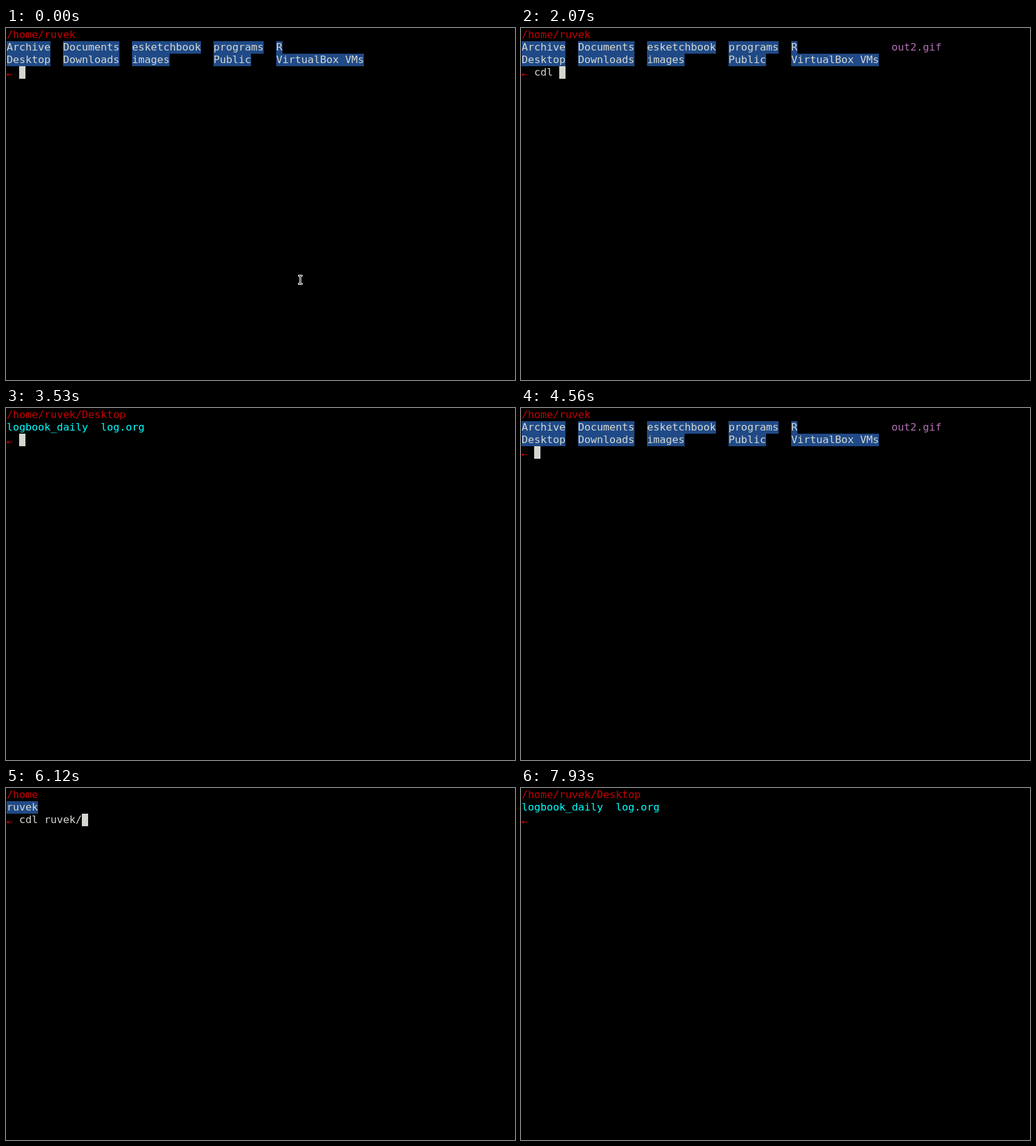
An HTML page that plays this animation: 812 px wide and 562 px high, repeating every 8 s.

```html
<!DOCTYPE html>
<html lang="en">
<head>
<meta charset="utf-8">
<title>Terminal session</title>
<style>
  html, body { margin: 0; width: 100%; height: 100%; overflow: hidden; background: #000; }
  svg { display: block; width: 812px; height: 562px; }
  text { font: 16.67px "DejaVu Sans Mono", monospace; white-space: pre; }
</style>
</head>
<body>
<svg id="stage" viewBox="0 0 812 562" xmlns="http://www.w3.org/2000/svg">
  <rect width="812" height="562" fill="#000"/>
  <g id="screen"></g>
  <g id="pointer" shape-rendering="crispEdges">
    <path fill="#fff" d="M466 394h7v3h-2v10h2v3h-7v-3h2v-10h-2z"/>
    <path fill="#000" d="M467 395h2v1h1v-1h2v1h-2v12h2v1h-2v-1h-1v1h-2v-1h2v-12h-2z"/>
  </g>
</svg>
<script>
const LOOP = 8000, CELL_W = 10, CELL_H = 20, PAD = 1, BASELINE = 15;
const RED = '#c40000', GREY = '#d3d7cf', BLUE = '#204a87', CYAN = '#00ffff', PINK = '#b070b0';
const USER = 'ruvek', HOME = '/home/' + USER;

const col = c => PAD + c * CELL_W;
const row = r => PAD + r * CELL_H;

function cells(c, r, n, fill) {
  return `<rect x="${col(c)}" y="${row(r)}" width="${n * CELL_W}" height="${CELL_H}" fill="${fill}"/>`;
}

// Each glyph sits on the terminal grid.
function print(c, r, str, fill) {
  const xs = [...str].map((_, i) => col(c + i)).join(' ');
  return `<text x="${xs}" y="${row(r) + BASELINE}" fill="${fill}">${str}</text>`;
}

const folder = (c, r, name) => cells(c, r, name.length, BLUE) + print(c, r, name, GREY);

const homeDirs = [
  [0, 'Archive', 'Desktop'],
  [9, 'Documents', 'Downloads'],
  [20, 'esketchbook', 'images'],
  [33, 'programs', 'Public'],
  [43, 'R', 'VirtualBox VMs']
].map(([c, top, low]) => folder(c, 1, top) + folder(c, 2, low)).join('');

const oldHome = { promptRow: 3, body: print(0, 0, HOME, RED) + homeDirs };
const home = { promptRow: 3, body: oldHome.body + print(59, 1, 'out2.gif', PINK) };
const desktop = {
  promptRow: 2,
  body: print(0, 0, HOME + '/Desktop', RED) +
        print(0, 1, 'logbook_daily', CYAN) + print(15, 1, 'log.org', CYAN)
};
const root = { promptRow: 2, body: print(0, 0, '/home', RED) + folder(0, 1, USER) };

// Listing on screen, then [time, typed text, cursor shown]
const session = [
  [oldHome, [0, ''], [100, '', false], [660, ''], [740, ''], [820, 'c'], [900, 'cd'], [980, 'cdl']],
  [home, [1310, ''], [1680, 'c'], [1780, 'cd'], [1880, 'cdl'], [2070, 'cdl '],
    [2630, 'cdl D'], [2860, 'cdl De'], [3090, 'cdl Desktop/']],
  [desktop, [3530, ''], [4050, '.'], [4130, '..'], [4330, '..l']],
  [home, [4560, ''], [4700, '.'], [4780, '..'], [4970, '..l']],
  [root, [5200, ''], [5410, 'c'], [5490, 'cd'], [5570, 'cdl'], [5730, 'cdl '],
    [5840, `cdl ${USER[0]}`], [6020, `cdl ${USER.slice(0, 2)}`], [6120, `cdl ${USER}/`],
    [6630, `cdl ${USER}/D`], [6870, `cdl ${USER}/De`], [7120, `cdl ${USER}/Desktop/`]],
  [desktop, [7400, ''], [7930, '', false]]
];
const steps = session.flatMap(([view, ...keys]) =>
  keys.map(([time, typed, cursor = true]) => ({ time, view, typed, cursor })));

const POINTER_HIDES = 740;
const screen = document.getElementById('screen');
const pointer = document.getElementById('pointer');
let shown = null;

function prompt(r) {
  const y = row(r) + 13;
  return `<path fill="${RED}" shape-rendering="crispEdges" ` +
    `d="M1 ${y}h1v-1h1v-1h1v2h6v1h-6v2h-1v-1h-1v-1h-1z"/>`;
}

function draw(t) {
  const step = steps.findLast(s => s.time <= t);
  if (step === shown) return;
  shown = step;
  const { view, typed, cursor } = step, r = view.promptRow;
  screen.innerHTML = view.body + prompt(r) +
    (typed ? print(2, r, typed, GREY) : '') +
    (cursor ? cells(2 + typed.length, r, 1, GREY) : '');
  pointer.style.display = t < POINTER_HIDES ? '' : 'none';
}

const start = performance.now();
function tick() {
  draw((performance.now() - start) % LOOP);
  requestAnimationFrame(tick);
}
tick();
</script>
</body>
</html>
```
